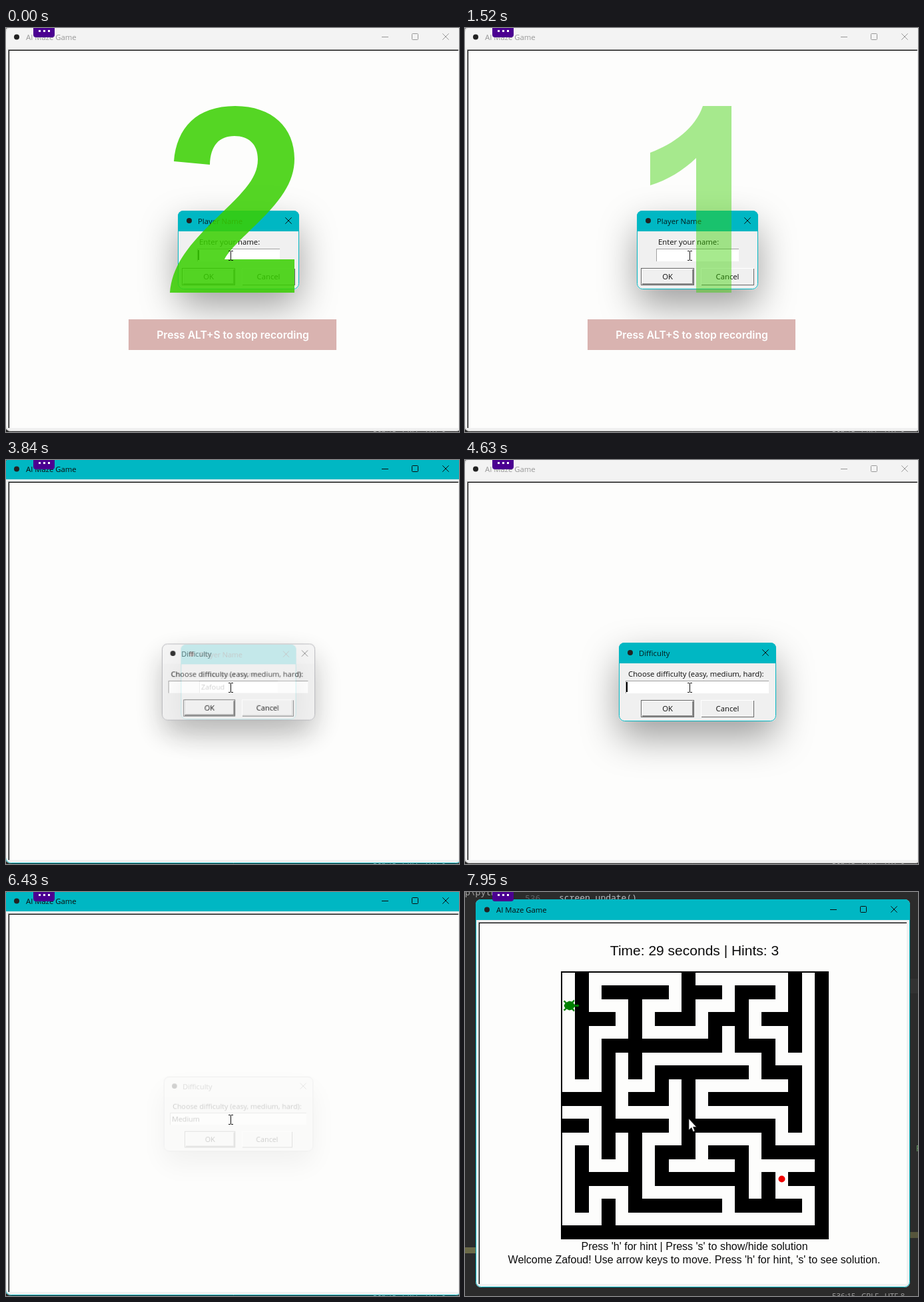
Recreate the animation shown at these times as an HTML page with a canvas. Size 680 by 606 pixels, loop 8000 ms.

```html
<!DOCTYPE html>
<html lang="en">
<head>
<meta charset="utf-8">
<title>Maze game</title>
<style>
  html, body { margin: 0; width: 100%; height: 100%; overflow: hidden; background: #fdfdfc; }
  canvas { display: block; }
</style>
</head>
<body>
<canvas id="stage" width="680" height="606"></canvas>
<script>
const LOOP = 8000;
const W = 680, H = 606;
const stage = document.getElementById('stage').getContext('2d');
const buffer = document.createElement('canvas');
buffer.width = W;
buffer.height = H;
const layerCtx = buffer.getContext('2d');
let c = stage;

const FACE = '#f0f0f0', BAR = '#f3f3f3', PAPER = '#fdfdfc', TEAL = '#00b7c3', INK = '#0c0c0c';
const UI = '11.3px "Open Sans", "Noto Sans", sans-serif';
const ARIAL = '"Liberation Sans", Arial, sans-serif';
const MONO = '13px "Noto Sans Mono", "DejaVu Sans Mono", monospace';

const PLAYER = 'Zafoud', LEVEL = 'Medium';
const PLAYER_KEYS = [2480, 2560, 2840, 3000, 3160, 3320];
const LEVEL_KEYS = [5190, 5270, 5470, 5550, 5790, 5990];

const MAZE = [
  '.#.......#.......#.#',
  '.#.#####.###.###.#.#',
  '.#...#...#...#...#.#',
  '.###.#.###.###.###.#',
  '.#...#.....#.#...#.#',
  '.#.#########.###.#.#',
  '.#.#.#.........#...#',
  '.#.#.#.#######.###.#',
  '...#...#.#.......#.#',
  '####.###.#.#######.#',
  '...#.....#.......#.#',
  '##.#####.#######.#.#',
  '...#.#...#.....#...#',
  '.#.#.#.###.###.#####',
  '.#...#.#.....#.....#',
  '.#####.#######.#.###',
  '.#...#.......#.#...#',
  '.#.#.#######.#####.#',
  '...#...............#',
  '####################'
];

// One side of the turtle, nose first: [along, across]
const TURTLE = [[16, 0], [14, 2], [10, 1], [7, 4], [9, 7], [8, 9], [5, 6],
  [1, 7], [-3, 5], [-6, 8], [-8, 6], [-5, 4], [-7, 0]];

const DIALOGS = {
  name: { x: 258, w: 182, title: 'Player Name', label: 'Enter your name:', labelX: 290, entryX: 287, entryW: 124 },
  level: { x: 231, w: 236, title: 'Difficulty', label: 'Choose difficulty (easy, medium, hard):', labelX: 245, entryX: 241, entryW: 215 }
};

const clamp = v => Math.max(0, Math.min(1, v));
const during = (t, a, b) => t >= a && t < b;
const typed = (t, text, keys) => text.slice(0, keys.filter(k => t >= k).length);

function box(x, y, w, h, color) {
  c.fillStyle = color;
  c.fillRect(x, y, w, h);
}

function text(str, x, y, font, color, align = 'left') {
  c.font = font;
  c.fillStyle = color;
  c.textAlign = align;
  c.fillText(str, x, y);
}

function round(x, y, w, h, r) {
  c.beginPath();
  c.roundRect(x, y, w, h, r);
}

function dot(x, y, r, color) {
  c.fillStyle = color;
  c.beginPath();
  c.arc(x, y, r, 0, 7);
  c.fill();
}

function stroke(color, points, width = 1) {
  c.strokeStyle = color;
  c.lineWidth = width;
  c.beginPath();
  for (const [x1, y1, x2, y2] of points) {
    c.moveTo(x1, y1);
    c.lineTo(x2, y2);
  }
  c.stroke();
}

function cross(x, y, color) {
  stroke(color, [[x - 4.7, y - 4.7, x + 4.7, y + 4.7], [x - 4.7, y + 4.7, x + 4.7, y - 4.7]]);
}

// Draws a group with shared opacity and scale
function layer(alpha, scale, cx, cy, draw) {
  if (alpha <= 0) return;
  layerCtx.clearRect(0, 0, W, H);
  c = layerCtx;
  draw();
  c = stage;
  c.save();
  c.globalAlpha = alpha;
  c.translate(cx, cy);
  c.scale(scale, scale);
  c.drawImage(buffer, -cx, -cy);
  c.restore();
}

function mainWindow(x, y, w, h, active) {
  const ink = active ? INK : '#989898';
  c.save();
  round(x, y, w, h, 8);
  c.clip();
  box(x, y, w, h, FACE);
  box(x, y, w, 31, active ? TEAL : BAR);
  const cw = w - 10, ch = h - 40;
  box(x + 5, y + 35, cw, ch, PAPER);
  box(x + 4, y + 34, cw + 1, 1, '#a0a0a0');
  box(x + 4, y + 34, 1, ch + 1, '#a0a0a0');
  box(x + 5, y + 35, cw, 1, '#000');
  box(x + 5, y + 35, 1, ch, '#000');
  c.restore();
  round(x + .5, y + .5, w - 1, h - 1, 8);
  c.strokeStyle = active ? TEAL : '#c4c4c4';
  c.lineWidth = 1;
  c.stroke();

  const mid = y + 15.5, right = x + w;
  dot(x + 17, mid, 4, '#222');
  text('AI Maze Game', x + 31, y + 20, UI, ink);
  stroke(ink, [[right - 120, mid, right - 110, mid]]);
  round(right - 74.5, mid - 5, 9, 9, 1);
  c.stroke();
  cross(right - 24, mid - .5, ink);
}

function button(label, x, focus) {
  const y = 360, w = 80, h = 26;
  box(x, y, w, h, focus ? '#646464' : '#fff');
  box(x + 1, y + 1, w - 1, h - 1, '#696969');
  box(x + 1, y + 1, w - 2, h - 2, focus ? '#fff' : FACE);
  if (focus) {
    box(x + 2, y + 2, w - 3, h - 3, '#8a8a8a');
    box(x + 2, y + 2, w - 5, h - 5, FACE);
  }
  text(label, x + w / 2, 377, UI, INK, 'center');
}

function shadow(x, w, opacity, blur, dy) {
  c.save();
  c.shadowColor = `rgba(0,0,0,${opacity})`;
  c.shadowBlur = blur;
  c.shadowOffsetY = dy;
  c.fillStyle = FACE;
  round(x, 274, w, 118, 8);
  c.fill();
  c.restore();
}

function dialog(d, value, caret, active) {
  const { x, w } = d;
  if (active) shadow(x, w, .38, 56, 24);
  else shadow(x, w, .26, 44, 20);
  c.save();
  round(x, 274, w, 118, 8);
  c.clip();
  box(x, 274, w, 118, FACE);
  box(x, 274, w, 31, active ? TEAL : BAR);
  c.restore();
  round(x + .5, 274.5, w - 1, 117, 8);
  c.strokeStyle = active ? TEAL : '#b4b4b8';
  c.lineWidth = 1;
  c.stroke();
  dot(x + 17, 289, 4, '#222');
  text(d.title, x + 30, 294, UI, active ? '#041c1c' : '#555');
  cross(x + w - 16, 289, active ? INK : '#858585');
  text(d.label, d.labelX, 325, UI, INK);

  box(d.entryX, 331, d.entryW, 19, '#a0a0a0');
  box(d.entryX + 1, 332, d.entryW - 1, 18, '#fff');
  text(value, d.entryX + 3, 345, UI, INK);
  if (caret) box(d.entryX + 1 + c.measureText(value).width, 333, 2, 15, '#000');
  button('OK', 264, true);
  button('Cancel', 354, false);
}

// Shows a dialog with its opening and closing motion
function showDialog(t, d, value, caret, open, close, active) {
  if (t < open || t >= close + 200) return;
  const a = clamp((t - open) / 250), b = clamp((t - close) / 200);
  const grow = 1 - Math.pow(1 - a, 3);
  const alpha = clamp(a * 1.9) * (1 - b);
  const scale = (.82 + .18 * grow) * (1 - .06 * b);
  layer(alpha, scale, d.x + d.w / 2, 333, () => dialog(d, value, caret, active));
}

function countdown(t) {
  box(184, 437, 312, 46, '#d9b3b0');
  text('Press ALT+S to stop recording', 340.5, 466, '600 15.7px Inter, Roboto, sans-serif', '#fff', 'center');
  const two = t < 720;
  const phase = two ? (t + 280) / 1000 : (t - 720) / 960;
  c.save();
  c.globalAlpha = .86 * (1 - Math.pow(phase, 4));
  c.fillStyle = '#39d000';
  c.fill(new Path2D(two
    ? 'M252 200C256 150 286 117 344 117C400 117 433 150 433 196C433 232 412 260 370 300C352 318 334 334 328 347H433V397H246C249 360 270 330 308 293C352 250 378 228 378 197C378 174 364 162 343 162C320 162 307 176 306 205Z'
    : 'M357 117H400V397H347V195C327 214 304 228 278 236V187C313 174 346 150 357 117Z'));
  c.restore();
}

function editor() {
  box(0, 0, W, H, '#2b2b2b');
  box(0, 533, 17, 9, '#6b6a48');
  box(667, 510, 13, 9, '#56553c');
  box(667, 130, 13, 22, '#323232');
  text('p\\pyth', 0, 5, MONO, '#a9a9a9');
  text('536', 90, 14, MONO, '#606366');
  text('screen.update()', 141, 13, MONO, '#b9bec4');
  text('F', 677, 389, MONO, '#6a9a66');
  text('536:15   CRLF   UTF-8', 551, 610, UI, '#a5a5a5');
}

function maze() {
  box(144, 119, 402, 2, '#000');
  box(144, 119, 2, 402, '#000');
  MAZE.forEach((row, r) => {
    for (const run of row.matchAll(/#+/g)) {
      box(145 + 20 * run.index, 120 + 20 * r, 20 * run[0].length + 1, 21, '#000');
    }
  });
}

function turtle(x, y) {
  c.fillStyle = '#008000';
  c.beginPath();
  for (const [u, v] of TURTLE) c.lineTo(x + u, y + v);
  for (const [u, v] of TURTLE.slice().reverse()) c.lineTo(x + u, y - v);
  c.fill();
}

function game(t) {
  editor();
  mainWindow(16, 11, 652, 582, true);
  if (t >= 6550) {
    maze();
    const steps = (t >= 7670) + (t >= 7830);
    turtle(155.5, 130.5 + 20 * steps);
  }
  if (t >= 6670) dot(475.5, 430.5, 5, '#f00000');
  if (t >= 6750) {
    const font = '16px ' + ARIAL;
    text("Press 'h' for hint | Press 's' to show/hide solution", 344.5, 537, font, INK, 'center');
    text(`Welcome ${PLAYER}! Use arrow keys to move. Press 'h' for hint, 's' to see solution.`, 344, 557, font, INK, 'center');
  }
  if (t >= 6830) {
    const left = t < 7830 ? 30 : 29;
    text(`Time: ${left} seconds | Hints: 3`, 344.5, 95, '21px ' + ARIAL, INK, 'center');
  }
}

function beam() {
  stroke('#111', [[337.5, 335, 337.5, 348], [334, 334.5, 337, 334.5], [338, 334.5, 341, 334.5],
    [334, 348.5, 337, 348.5], [338, 348.5, 341, 348.5]]);
}

function arrow() {
  const p = new Path2D('M336 340V357L340 353.5L342.5 359.5L345 358.5L342.5 352.5H347.5Z');
  c.fillStyle = '#fff';
  c.fill(p);
  c.strokeStyle = '#222';
  c.lineWidth = .7;
  c.stroke(p);
}

function recorder() {
  c.fillStyle = '#4b0091';
  round(41, -6, 32, 20, 4);
  c.fill();
  for (const x of [49, 56, 63]) box(x, 3, 3, 3, '#fff');
}

function setup(t) {
  editor();
  mainWindow(-1, -2, 685, 607, during(t, 3680, 4100) || t >= 6310);
  const blink = (t + 200) % 940 < 600;
  showDialog(t, DIALOGS.level, typed(t, LEVEL, LEVEL_KEYS), during(t, 4100, 6150), 3720, 6270, during(t, 4100, 6310));
  showDialog(t, DIALOGS.name, typed(t, PLAYER, PLAYER_KEYS), t < 2480 ? blink : t < 3640, -1000, 3680, true);
  if (t < 1680) countdown(t);
  beam();
}

function draw(t) {
  c = stage;
  if (t < 6510) {
    setup(t);
  } else {
    game(t);
    arrow();
  }
  recorder();
}

const start = performance.now();
function tick() {
  draw((performance.now() - start) % LOOP);
  requestAnimationFrame(tick);
}
tick();
</script>
</body>
</html>
```
